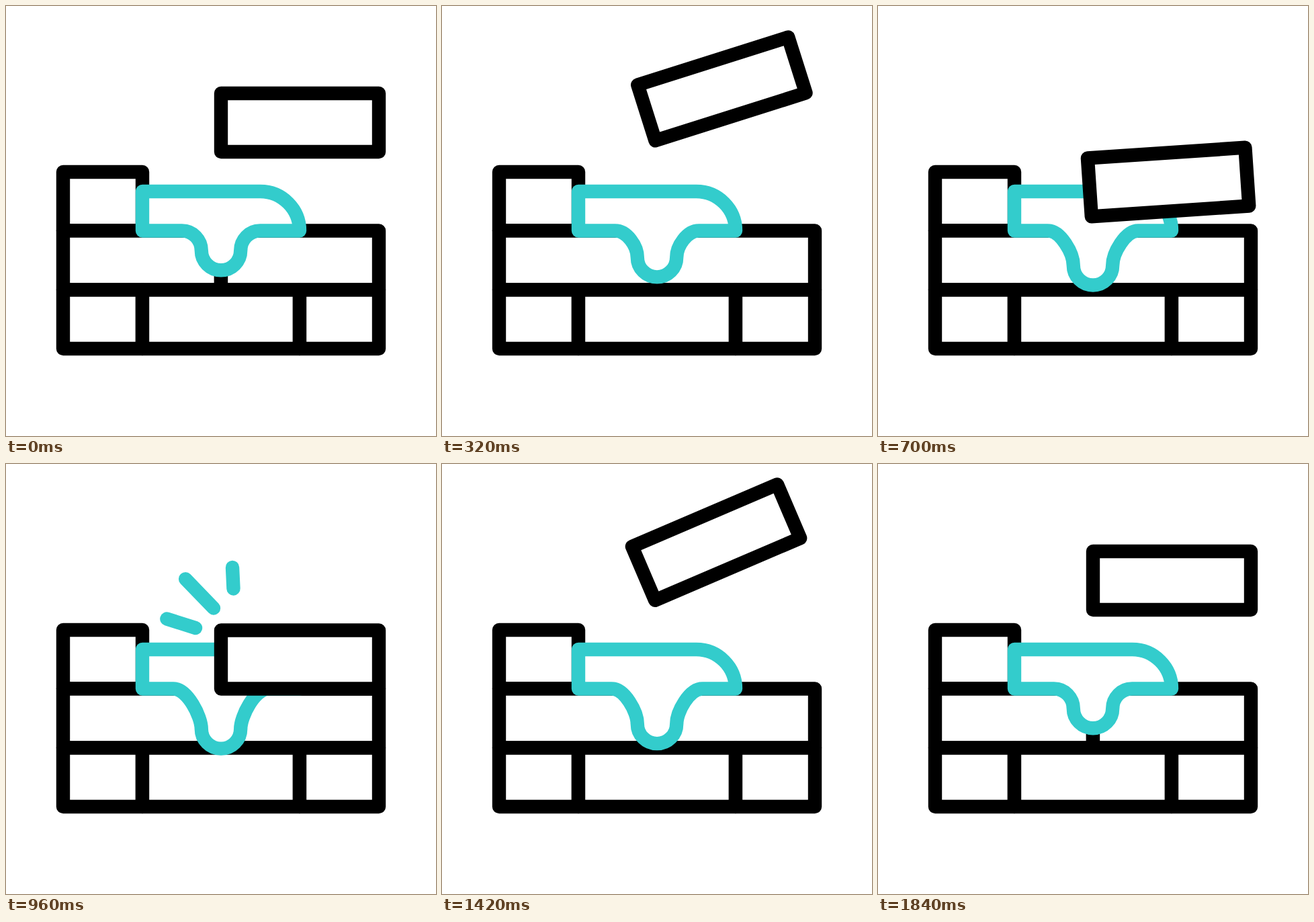
Recreate the animation shown at these times as an HTML page. Size 640 px wide and 640 px high, loop 2400 ms.

```html
<!DOCTYPE html>
<html lang="en">
<head>
<meta charset="utf-8">
<title>Bricklaying</title>
<style>
  html, body { margin: 0; width: 100%; height: 100%; overflow: hidden; background: #fff; }
  svg { display: block; width: 100vw; height: 100vh; }
  svg * { stroke-width: 20.4; stroke-linejoin: round; stroke-linecap: round; }
  .black { fill: #fff; stroke: #000; }
  .teal { fill: #fff; stroke: #3cc; }
  .track { fill: none; stroke: none; }
</style>
</head>
<body>
<svg viewBox="0 0 640 640">
  <g class="black">
    <path d="M85 247H203V334.5H85Z"/>
    <path d="M85 334.5H320V422.5H85Z"/>
    <path d="M320 334.5H555V422.5H320Z"/>
    <path d="M85 422.5H203V510H85Z"/>
    <path d="M203 422.5H437V510H203Z"/>
    <path d="M437 422.5H555V510H437Z"/>
  </g>
  <path id="mortar" class="teal"/>
  <g id="sparks" class="teal"></g>
  <path id="brick" class="black" d="M-117.5 -43.5H117.5V43.5H-117.5Z"/>
  <path id="rise" class="track" d="M437.5 173.5C432.6 163.8 408 96 408 115.5"/>
  <path id="fall" class="track" d="M408 115.5C408 135 437.5 291 437.5 291"/>
</svg>
<script>
const LOOP = 2400, TILT = 23.3, END = 1833;
const el = id => document.getElementById(id);
const mortar = el('mortar'), brick = el('brick'), rise = el('rise'), fall = el('fall');

const span = (t, a, b) => Math.min(1, Math.max(0, (t - a) / (b - a)));
const ease = (t, a, b) => { const x = span(t, a, b); return x * x * (3 - 2 * x); };

// inner end, outer end, time when fully erased
const sparks = [
  [282, 244, 222, 225, 1326],
  [309, 214.5, 250, 153.5, 1250],
  [338.5, 185.5, 336.4, 141, 1250]
].map(([x1, y1, x2, y2, gone]) => {
  const line = document.createElementNS('http://www.w3.org/2000/svg', 'path');
  el('sparks').append(line);
  const at = k => `${x1 + (x2 - x1) * k} ${y1 + (y2 - y1) * k}`;
  return t => {
    const from = ease(t, 1067, gone), to = ease(t, 800, 1050);
    line.setAttribute('d', to > from ? `M${at(from)}L${at(to)}` : '');
  };
});

function drawMortar(t) {
  const d = 37 * (t < 1167 ? span(t, 0, 1167) : 1 - span(t, 1167, END));
  const x = 262 - 0.42 * d, y = 364 + d;
  const h = x + 16 + 0.15 * d, v = y - 16 - 0.1 * d;
  mortar.setAttribute('d', `M203 276H378.5A58.5 58.5 0 0 1 437 334.5H${640 - x}
    C${640 - h} 334.5 349.2 ${v} 349.2 ${y}A29.2 29.2 0 0 1 290.8 ${y}
    C290.8 ${v} ${h} 334.5 ${x} 334.5H203Z`);
}

function drawBrick(t) {
  // lift: 0 when lying flat, 1 at the top of the swing
  const lift = t < 474 ? ease(t, 0, 474)
    : t < 1000 ? 1 - ease(t, 474, 780)
    : t < 1436 ? ease(t, 1106, 1436)
    : 1 - ease(t, 1436, END);
  const low = t >= 474 && t < 1436;
  const track = low ? fall : rise;
  const p = track.getPointAtLength(track.getTotalLength() * (low ? 1 - lift : lift));
  brick.setAttribute('transform', `translate(${p.x} ${p.y}) rotate(${-TILT * lift})`);
}

function frame() {
  const t = performance.now() % LOOP;
  drawMortar(t);
  drawBrick(t);
  sparks.forEach(draw => draw(t));
  requestAnimationFrame(frame);
}
frame();
</script>
</body>
</html>
```
